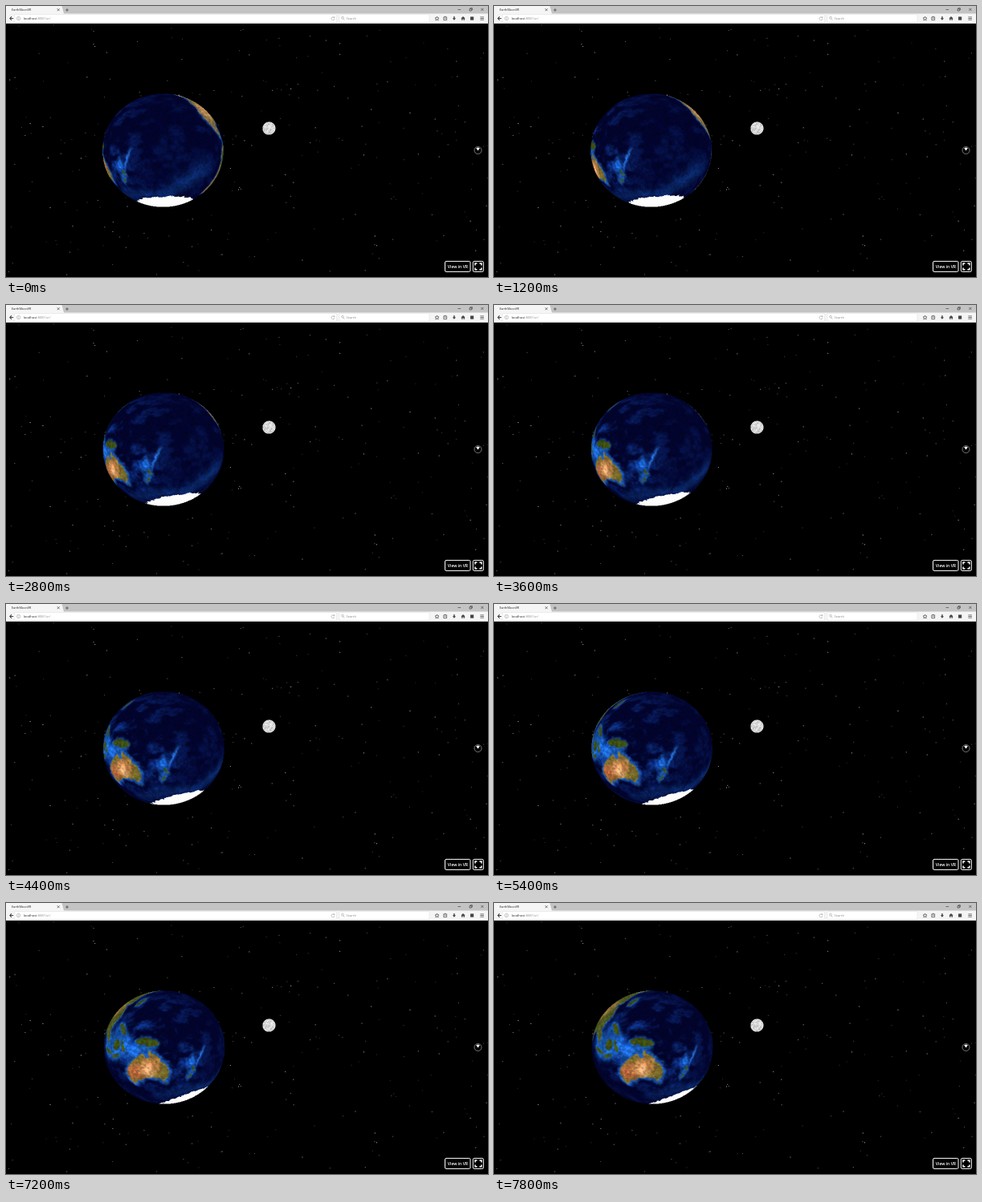
Recreate the animation shown at these times as an HTML page with a canvas. Size 600 by 338 pixels, loop 8000 ms.

```html
<!DOCTYPE html>
<html lang="en">
<head>
<meta charset="utf-8">
<title>EarthMoonVR</title>
<style>
html, body { margin: 0; width: 100%; height: 100%; overflow: hidden; background: #000; }
canvas, svg { position: absolute; left: 0; top: 0; width: 600px; height: 338px; display: block; }
text { font-family: "Open Sans", sans-serif; }
.icons { fill: none; stroke: #444; stroke-width: .7; }
.faint { stroke: #888; stroke-width: .5; }
</style>
</head>
<body>
<canvas id="space" width="600" height="338"></canvas>
<svg viewBox="0 0 600 338">
  <!-- browser bar -->
  <rect width="600" height="22" fill="#f5f5f5"/>
  <path d="M69.5 0H600V9.5H72z" fill="#c3c3c3"/>
  <rect y="21.2" width="600" height=".8" fill="#c8c8c8"/>
  <g fill="#fff" stroke="#dedede" stroke-width=".5">
    <rect x="10.5" y="10.8" width="401" height="9.4"/>
    <rect x="415" y="10.8" width="112" height="9.4"/>
    <circle cx="7" cy="15.5" r="4.3"/>
  </g>
  <g font-size="4" fill="#222">
    <text x="7" y="6.2" font-size="3.8">EarthMoonVR</text>
    <text x="21.8" y="17">localhost<tspan fill="#8a8a8a">:8081/vr/</tspan></text>
    <text x="423.5" y="17" fill="#8a8a8a">Search</text>
  </g>
  <g class="icons">
    <path d="M63.7 3.2l3 3M66.7 3.2l-3 3M74 5h4M76 3v4M562.5 4.5h3.6M577 3.6h2.4v2.4h-2.4zM578 3.4v-.8h2.4v2.4h-.8M591.3 2.9l3 3M594.3 2.9l-3 3"/>
    <path d="M9.3 15.5H5M7 13.2L4.8 15.5L7 17.8" stroke-width="1.1"/>
    <path class="faint" d="M13.4 15.5a2.2 2.2 0 1 1 4.4 0a2.2 2.2 0 1 1-4.4 0M15.6 14.2v.6M15.6 15.3v1.5"/>
    <path class="faint" d="M408.6 14.5A2 2 0 1 0 409 16M409 13v1.7h-1.7M420 15.9L421.4 17.4M420.4 14.7a1.4 1.4 0 1 1-2.8 0a1.4 1.4 0 1 1 2.8 0"/>
    <path d="M536.5 13l.7 1.7 1.8.2-1.3 1.2.4 1.8-1.6-.9-1.6.9.4-1.8-1.3-1.2 1.8-.2zM544.8 13.8h3.8v3.8h-3.8zM545.8 13.3h1.8M545.9 15.6h1.7M590.3 13.8h4.6M590.3 15.5h4.6M590.3 17.2h4.6"/>
    <path fill="#444" stroke="none" d="M557.2 13h1.4v2.2h1.4l-2.1 2.5-2.1-2.5h1.4zM569 13l2.7 2.5h-.8v2.2h-1.3v-1.4h-1.2v1.4h-1.3v-2.2h-.8z"/>
    <rect x="578" y="13.4" width="4.2" height="4.2" fill="#444" stroke="none"/>
  </g>
  <!-- viewer controls -->
  <circle cx="587.5" cy="180" r="4.5" fill="#000" stroke="#aaa" stroke-width=".7"/>
  <path d="M585.2 177.2q2.3-1.6 4.6 0L587.5 180.4z" fill="#fff"/>
  <g fill="#000" stroke="#fff">
    <rect x="546.5" y="318.4" width="31.5" height="13" rx="1.5"/>
    <rect x="581.3" y="318.4" width="13" height="13" rx="1.5"/>
    <path d="M584 323.4v-2.4h2.4M589.4 321h2.4v2.4M591.8 326.4v2.4h-2.4M586.4 328.8h-2.4v-2.4" stroke-width="1.5"/>
  </g>
  <text x="549.8" y="326.8" font-size="5.1" font-weight="600" fill="#fff">View in VR</text>
</svg>
<script>
const LOOP = 8000, STEP = 200;
const FOCAL = 273.7, CX = 300, CY = 180;
const W = 1080, H = 540, K = W / 360;
const RAD = Math.PI / 180;
const clamp = v => Math.max(0, Math.min(1, v));

function seeded(s) {
  return () => (s = (s * 1664525 + 1013904223) >>> 0) / 4294967296;
}

const lattice = Float32Array.from({ length: 65536 }, seeded(11));

function noise(x, y) {
  const xi = Math.floor(x), yi = Math.floor(y);
  let u = x - xi, v = y - yi;
  u *= u * (3 - 2 * u);
  v *= v * (3 - 2 * v);
  const at = (i, j) => lattice[((j & 255) << 8) | (i & 255)];
  const a = at(xi, yi), b = at(xi + 1, yi), c = at(xi, yi + 1), d = at(xi + 1, yi + 1);
  return a + (b - a) * u + (c - a) * v + (a - b - c + d) * u * v;
}

function fbm(x, y) {
  let sum = 0, amp = .5;
  for (let i = 0; i < 4; i++, amp /= 2, x = x * 2 + 17, y = y * 2 + 31) sum += amp * noise(x, y);
  return sum / .94;
}

function makeCanvas(w, h) {
  const c = document.createElement('canvas');
  c.width = w;
  c.height = h;
  return c.getContext('2d', { willReadFrequently: true });
}

// Map places are longitude (0 to 360) and latitude in degrees.
function outline(pts) {
  const p = new Path2D();
  for (let i = 0; i < pts.length; i += 2) p.lineTo(pts[i] * K, (90 - pts[i + 1]) * K);
  p.closePath();
  return p;
}

function oval(lon, lat, rx, ry, turn = 0) {
  const p = new Path2D();
  p.ellipse(lon * K, (90 - lat) * K, rx * K, ry * K, turn * RAD, 0, 7);
  return p;
}

function earthMap() {
  const g = makeCanvas(W, H);
  const fill = (path, color, blur = 0) => {
    g.filter = blur ? `blur(${blur}px)` : 'none';
    g.fillStyle = color;
    g.fill(path);
  };
  const land = (path, color, shelf = 3) => {
    g.filter = 'blur(3px)';
    g.strokeStyle = '#1c5cb6';
    g.lineWidth = shelf * K;
    g.stroke(path);
    fill(path, color);
  };
  const shade = (path, ...spots) => {
    g.save();
    g.clip(path);
    for (const [color, ...at] of spots) fill(oval(...at), color, 7);
    g.restore();
  };

  fill(oval(180, 0, 400, 400), '#02042c');
  fill(oval(240, -42, 32, 9, -40), '#09235c', 16);
  fill(oval(175, -56, 60, 5), '#0a2765', 12);
  fill(oval(112, 2, 17, 12), '#1650a2', 9);
  fill(oval(134, -9, 14, 4), '#1c5cb6', 6);
  fill(oval(174, -32, 3, 13, 12), '#17509f', 6);
  fill(oval(184, -23, 1, 12, 24), '#2360b0', 2);

  const asia = outline([75, 10, 95, 20, 103, 4, 108, 18, 119, 26, 121, 38, 133, 43, 140, 54, 162, 61, 186, 66, 170, 74, 75, 78]);
  land(asia, '#4c561f');
  shade(asia, ['#8f733c', 92, 42, 26, 12], ['#e9e9e0', 135, 70, 45, 8]);

  const northAmerica = outline([200, 66, 215, 62, 236, 51, 242, 37, 251, 22, 263, 15, 280, 8, 270, 22, 285, 35, 290, 70, 205, 71]);
  land(northAmerica, '#77663a');
  shade(northAmerica, ['#b98c58', 258, 38, 13, 12], ['#eeeee6', 228, 64, 26, 9]);

  const southAmerica = outline([283, 6, 280, -4, 287, -18, 288, -50, 300, -50, 310, -5]);
  land(southAmerica, '#7d6938');
  shade(southAmerica, ['#2c4a14', 295, -6, 11, 10]);

  const australia = outline([114, -23, 122, -17, 129, -13, 136, -12, 137, -16, 140, -17, 142.5, -11, 146, -18,
    153.5, -27, 150, -37.5, 144, -38.5, 138, -34, 131, -31.5, 124, -33.5, 115.5, -34.5]);
  land(australia, '#6f6426', 4);
  shade(australia, ['#b9673c', 124, -25, 9, 7], ['#c4804a', 137, -24, 11, 7], ['#e6b482', 136, -26, 3, 6]);

  const islands = [
    [142, -5, 9, 2.6, 18], [114, 1, 4, 5, 25], [101, 0, 7, 1.7, 45], [110, -7, 5, 1], [121, -2, 1.4, 4],
    [123, 12, 1.6, 6, -20], [138, 37, 1.6, 7, 45], [177, -34, 1, 3, -25], [173, -39, 1.2, 3.6, 40], [146.5, -42, 1.5, 1.4]
  ];
  for (const at of islands) land(oval(...at), '#3b4c12', 2);

  const ice = [0, -90];
  for (let lon = 0; lon <= 360; lon += 6) ice.push(lon, -64.5 + 6 * Math.cos((lon - 250) * RAD));
  fill(outline([...ice, 360, -90]), '#fdfdfd');
  g.filter = 'none';

  // Noise roughens the coasts, raises sea ridges and grains the land.
  const src = g.getImageData(0, 0, W, H).data;
  const img = g.createImageData(W, H), out = img.data;
  const hump = (d, r) => Math.exp(-d * d / (r * r));
  for (let n = 0; n < W * H; n++) {
    const x = n % W, y = n / W | 0, lon = x / K, lat = 90 - y / K;
    const sx = Math.max(0, Math.min(W - 1, x + (fbm(x / 13, y / 13 + 50) - .5) * 15 | 0));
    const sy = Math.max(0, Math.min(H - 1, y + (fbm(x / 13 + 90, y / 13) - .5) * 15 | 0));
    const i = (sy * W + sx) * 4, [r, gr, b] = [src[i], src[i + 1], src[i + 2]];
    const fine = fbm(x / 5 + 80, y / 5);
    let gain = .55 + .9 * fine, rise = 0;
    if (r > 215 && b > 205) gain = 1;
    else if (b > r * 1.1) {
      const west = hump(lon - 143, 36) * hump(lat + 2, 32) + .7 * hump(lon - 172, 13) * hump(lat + 27, 20);
      const relief = clamp((fbm(x / 32, y / 22) - .44) * 4.2);
      rise = clamp(relief * (.17 + .62 * west)) * (.4 + fine);
      gain = .6 + .8 * fine;
    }
    out[4 * n] = r * gain + rise * 16;
    out[4 * n + 1] = gr * gain + rise * 66;
    out[4 * n + 2] = b * gain + rise * 132;
    out[4 * n + 3] = 255;
  }
  return new Uint32Array(out.buffer);
}

function moonMap() {
  return Uint32Array.from({ length: W * H }, (_, n) => {
    const x = n % W, y = n / W | 0;
    const c = Math.min(240, 105 + 100 * fbm(x / 40, y / 40) + 120 * fbm(x / 16 + 60, y / 16)) | 0;
    return (0xff000000 | c * 0x10101) >>> 0;
  });
}

// A textured ball seen in perspective; left, top, w, h bound its picture.
function ball([x, y, z], r, map, tilt, lon0, [left, top, w, h]) {
  const S = 2, bw = w * S, bh = h * S;
  const g = makeCanvas(bw, bh), img = g.createImageData(bw, bh);
  const out = new Uint32Array(img.data.buffer);
  const hits = [], normals = [];
  for (let n = 0; n < bw * bh; n++) {
    const dx = (left + (n % bw + .5) / S - CX) / FOCAL;
    const dy = (CY - top - ((n / bw | 0) + .5) / S) / FOCAL;
    const a = dx * dx + dy * dy + 1, b = dx * x + dy * y - z;
    const disc = b * b - a * (x * x + y * y + z * z - r * r);
    if (disc < 0) continue;
    const k = (b - Math.sqrt(disc)) / a;
    hits.push(n);
    normals.push((k * dx - x) / r, (k * dy - y) / r, (-k - z) / r);
  }
  const ct = Math.cos(tilt * RAD), st = Math.sin(tilt * RAD);
  return (ctx, turn, shift) => {
    const c = Math.cos(turn * RAD), s = Math.sin(turn * RAD);
    hits.forEach((n, i) => {
      const nx = normals[3 * i], ny = normals[3 * i + 1], nz = normals[3 * i + 2];
      const px = nx * c - nz * s, pz = nx * s + nz * c;
      const up = ny * ct - pz * st, front = ny * st + pz * ct;
      const lon = (Math.atan2(px, front) / RAD + lon0 + 720) % 360;
      const lat = Math.asin(Math.max(-1, Math.min(1, up))) / RAD;
      out[n] = map[Math.min(H - 1, (90 - lat) * K | 0) * W + Math.min(W - 1, lon * K | 0)];
    });
    g.putImageData(img, 0, 0);
    ctx.drawImage(g.canvas, left + shift, top, w, h);
  };
}

function starField() {
  const g = makeCanvas(600, 338), rnd = seeded(2024);
  g.fillRect(0, 0, 600, 338);
  for (let i = 0; i < 260; i++) {
    const light = 45 + 150 * rnd() ** 2;
    g.fillStyle = `rgb(${light},${light},${light})`;
    g.fillRect(rnd() * 600, 22 + rnd() * 316, 1, 1);
  }
  return g.canvas;
}

const ctx = document.getElementById('space').getContext('2d');
ctx.imageSmoothingQuality = 'high';
const stars = starField();
const earth = ball([-25, 0, -70], 17.5, earthMap(), 16, 199, [116, 104, 160, 152]);
const moon = ball([10, 10, -100], 2.95, moonMap(), 0, 180, [316, 141, 24, 24]);

function draw(t) {
  ctx.drawImage(stars, 0, 0);
  earth(ctx, .7 + 8.2 * t, -.3 + .22 * t);
  moon(ctx, 2.7 * t, 0);
}

let start, shown = 0;
function tick(now) {
  start ??= now;
  const step = Math.floor((now - start) % LOOP / STEP);
  if (step !== shown) draw((shown = step) * STEP / 1000);
  requestAnimationFrame(tick);
}
draw(0);
requestAnimationFrame(tick);
</script>
</body>
</html>
```
